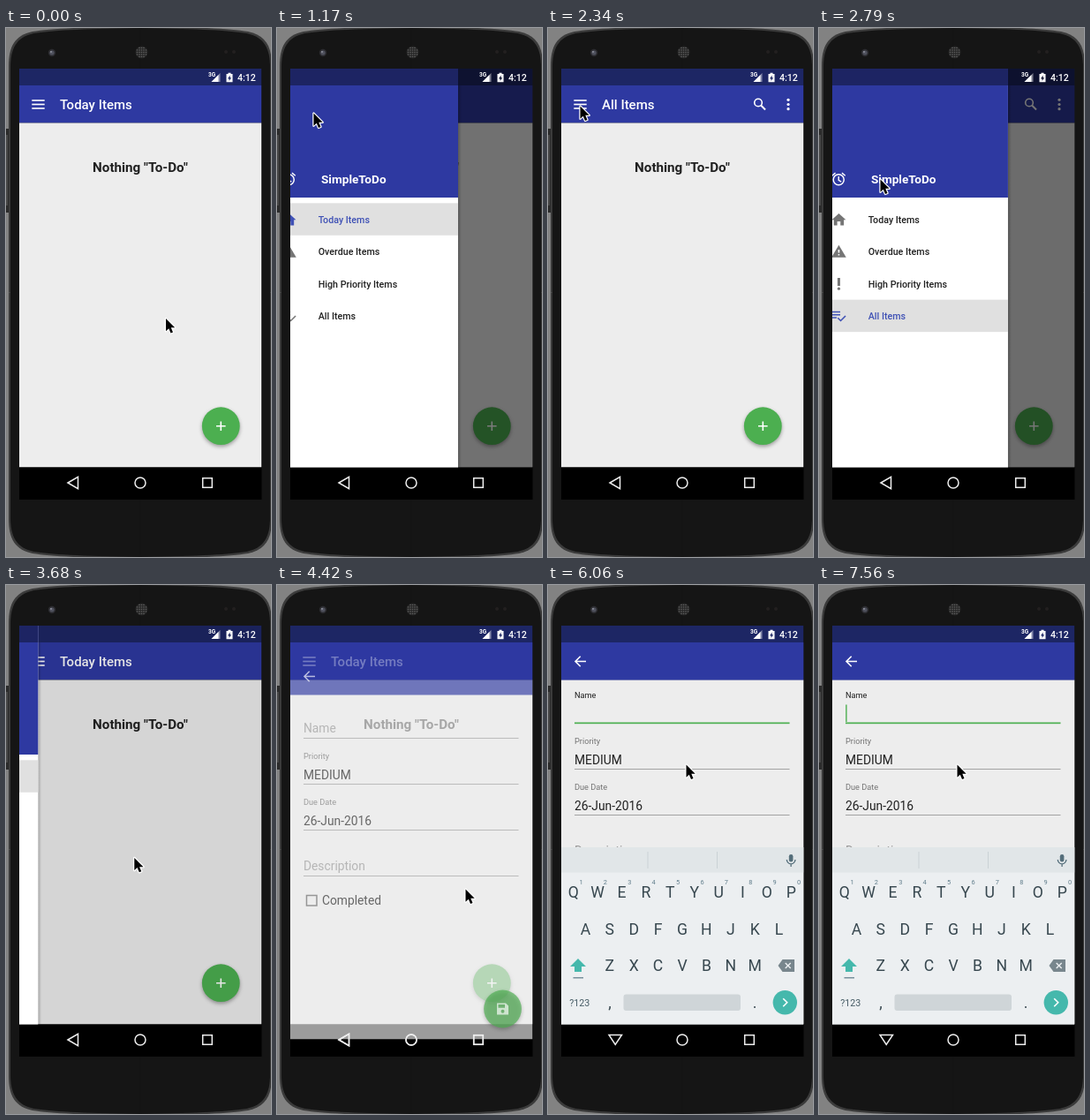
An HTML page with a canvas for the animation above (8 s loop, 300x599 px).

```html
<!DOCTYPE html>
<html lang="en">
<head>
<meta charset="utf-8">
<title>To-do app demo</title>
<style>
html, body { margin: 0; width: 100%; height: 100%; overflow: hidden; background: #808080; }
canvas { display: block; width: 300px; height: 599px; }
</style>
</head>
<body>
<canvas id="stage"></canvas>
<script>
const W = 300, H = 599, LOOP = 8000, STEP = 147.5;
const BLUE = '#2e39a1', GREEN = '#4caf50', TEAL = '#45b8ac', PAPER = '#ededed', INK = '#212121';
const LEFT = 15, WIDTH = 274.4, BOTTOM = 497.4;
const canvas = document.getElementById('stage');
const c = canvas.getContext('2d');
const dpr = window.devicePixelRatio || 1;
canvas.width = W * dpr;
canvas.height = H * dpr;

// Tracks: [step, value...] with linear motion between points
const POINTER = [
  [2, 180.5, 328.5], [5, 75, 135], [6, 38, 87], [7, 38, 88], [8, 41, 96], [9, 52, 165],
  [11, 70, 318], [13, 70, 313.5], [16, 36, 88], [17, 36, 88], [18, 42, 100],
  [19, 69, 171], [21, 78, 212], [23, 80, 216], [28, 242, 447], [29, 242, 447],
  [30, 213, 344], [33, 156, 160], [36, 152, 146], [38, 153, 160], [39, 156, 203]
];
const DRAWER = [
  [6, 0], [7, .45], [8, .892], [9, 1], [11, 1], [12, .8], [13, .333], [14, 0],
  [17, 0], [18, .5], [19, .934], [20, 1], [23, 1], [24, .65], [25, .1], [26, 0]
];
const FORM_Y = [[30, 17], [31, 4], [32, 0]];
const FORM_ALPHA = [[30, .66], [31, 1]];
const FOCUS = [[37, 0], [38, .6], [39, 1]];

function track(points, n) {
  let a = points[0];
  if (n <= a[0]) return a.slice(1);
  for (const b of points) {
    if (n <= b[0]) {
      const k = (n - a[0]) / (b[0] - a[0]);
      return a.slice(1).map((v, i) => v + (b[i + 1] - v) * k);
    }
    a = b;
  }
  return a.slice(1);
}

function rect(x, y, w, h, color) {
  c.fillStyle = color;
  c.fillRect(x, y, w, h);
}
function round(x, y, w, h, r, color) {
  c.fillStyle = color;
  c.beginPath();
  c.roundRect(x, y, w, h, r);
  c.fill();
}
function disc(x, y, r, color) {
  c.fillStyle = color;
  c.beginPath();
  c.arc(x, y, r, 0, 7);
  c.fill();
}
function ring(x, y, r, color, width) {
  c.strokeStyle = color;
  c.lineWidth = width;
  c.beginPath();
  c.arc(x, y, r, 0, 7);
  c.stroke();
}
function fill(d, color, x = 0, y = 0) {
  c.save();
  c.translate(x, y);
  c.fillStyle = color;
  c.fill(new Path2D(d), 'evenodd');
  c.restore();
}
function stroke(d, color, width, x = 0, y = 0) {
  c.save();
  c.translate(x, y);
  c.strokeStyle = color;
  c.lineWidth = width;
  c.stroke(new Path2D(d));
  c.restore();
}
// y is the middle of the capitals
function text(s, x, y, size, color, weight = 400, align = 'left') {
  c.font = `${weight} ${size}px Roboto, sans-serif`;
  c.textAlign = align;
  c.fillStyle = color;
  c.fillText(s, x, y + size * .356);
}
function clip(x, y, w, h, draw) {
  c.save();
  c.beginPath();
  c.rect(x, y, w, h);
  c.clip();
  draw();
  c.restore();
}

// Body with bowed top and bottom edges, symmetric about both axes
function shell(inset, color) {
  const quarter = new Path2D('M0 0H-149V-256C-149 -279 -142 -291 -122 -295.5C-102 -298.5 -72 -300.5 0 -301.5Z');
  c.fillStyle = color;
  for (const sx of [-1, 1]) {
    for (const sy of [-1, 1]) {
      c.save();
      c.translate(152, 299.5);
      c.scale(sx * (1 - inset / 149), sy * (1 - inset / 301));
      c.fill(quarter);
      c.restore();
    }
  }
  rect(5, 299, 294, 1, color);
  rect(151.5, 2, 1, 595, color);
}

function phone() {
  rect(0, 0, W, H, '#828282');
  round(-3, 114, 8, 95, 2, '#2b2b2b');
  rect(0, 121, 2, 80, '#4a4a4a');
  shell(0, '#3b3b3b');
  shell(2, '#151515');
  disc(52, 28, 4.2, '#2c2c30');
  disc(52, 28, 2.6, '#50525e');
  disc(51, 27, 1.1, '#8a8c98');
  disc(153.5, 27.5, 7, '#262626');
  for (let y = -5; y <= 5; y += 2.5)
    for (let x = -5; x <= 5; x += 2.5)
      if (Math.hypot(x, y) < 6.2) disc(153.5 + x, 27.5 + y, .8, '#626262');
  disc(249, 27, 2, '#232020');
  disc(258, 27, 2, '#232020');
}

function navBar(keyboard) {
  rect(LEFT, 497, WIDTH, 37, '#000');
  navIcons(keyboard);
}
function navIcons(keyboard) {
  stroke(keyboard ? 'M69 509.5H83.5L76.2 520.5Z' : 'M70 515L81.5 508.3V521.7Z', '#eee', 1.5);
  ring(152, 515, 6, '#eee', 1.5);
  c.strokeRect(222.7, 509.7, 10.6, 10.6);
}

function statusIcons() {
  text('3G', 229, 53, 6.5, '#fff', 700);
  fill('M242.5 51V61H232.5Z', 'rgba(255,255,255,.45)');
  fill('M240.5 53V61H232.5Z', '#fff');
  fill('M249.5 52H251.5V50.7H254.5V52H256.5V61.3H249.5ZM253.6 53.5L251 57.5H252.6V60L255.1 56.2H253.6Z', '#fff');
  text('4:12', 262, 56.3, 10.6, '#fff', 500);
}

function fab(x, y) {
  c.save();
  c.shadowColor = 'rgba(0,0,0,.35)';
  c.shadowBlur = 4 * dpr;
  c.shadowOffsetY = 2 * dpr;
  disc(x, y, 21.4, GREEN);
  c.restore();
}

function home(all) {
  rect(LEFT, 46, WIDTH, 19, '#1d2664');
  rect(LEFT, 65, WIDTH, 42.5, BLUE);
  rect(LEFT, 107.5, WIDTH, 390, PAPER);
  for (const y of [82, 86.5, 91]) rect(29.3, y - .8, 14.4, 1.6, '#fff');
  text(all ? 'All Items' : 'Today Items', 61, 87, 15, '#fff', 500);
  if (all) {
    ring(238, 84.5, 4.3, '#fff', 1.6);
    stroke('M241 87.5L246 92.5', '#fff', 2);
    for (const y of [81.3, 86.5, 91.7]) disc(272, y, 1.6, '#fff');
  }
  text('Nothing "To-Do"', 152, 158, 15.2, INK, 700, 'center');
  fab(243.3, 450.7);
  stroke('M-5.3 0H5.3M0 -5.3V5.3', '#fff', 1.6, 243.3, 450.7);
}

const ICONS = [
  col => fill('M-1.8 6.5V2H1.8V6.5H5.7V.3H8L0 -7L-8 .3H-5.7V6.5Z', col, 36.5, 217),
  col => fill('M-8.3 6.8H8.3L0 -7.2ZM-.8 2.9H.8V4.5H-.8ZM-.8 -2H.8V1.4H-.8Z', col, 36.5, 253),
  col => {
    rect(35, 283, 3, 9, col);
    disc(36.5, 295.2, 1.6, col);
  },
  col => {
    stroke('M-8 -4.5H2.5M-8 -1.3H2.5M-8 2H-1.5', col, 1.6, 35.6, 326);
    stroke('M-.3 2.3L3 5.5L8.5 0', col, 1.6, 35.6, 326);
  }
];
const ROWS = ['Today Items', 'Overdue Items', 'High Priority Items', 'All Items'];

function drawer(p, selected) {
  if (p <= 0) return;
  rect(LEFT, 46, WIDTH, 452, `rgba(0,0,0,${.57 * Math.pow(p, .75)})`);
  const edge = LEFT + 213 * p;
  const shade = c.createLinearGradient(edge, 0, edge + 4, 0);
  shade.addColorStop(0, 'rgba(0,0,0,.22)');
  shade.addColorStop(1, 'rgba(0,0,0,0)');
  rect(edge, 65, 4, 433, shade);
  c.translate(edge - 228, 0);
  rect(15, 46, 213, 452, '#fff');
  rect(15, 46, 213, 146, BLUE);
  rect(15, 46, 213, 19, '#1d2463');
  ring(36.3, 171.8, 6, '#fff', 1.5);
  stroke('M36.3 168V172.3L39.3 174.2M28.8 167.3L32.6 164.1M43.8 167.3L40 164.1', '#fff', 1.4);
  text('SimpleToDo', 73, 171.5, 13.6, '#fff', 700);
  ROWS.forEach((label, i) => {
    const y = 217 + 36.45 * i, on = i === selected;
    if (on) rect(15, y - 18.7, 213, 36.5, '#e0e0e0');
    ICONS[i](on ? '#3f51b5' : '#757575');
    text(label, 69.7, y, 10.7, on ? '#3f51b5' : INK, 500);
  });
}

function field(label, value, y) {
  text(label, 30, y - 21, 9.2, '#757575');
  text(value, 30, y, 13.8, INK);
  rect(30, y + 10, 243.5, 1, '#a2a2a2');
}

function form(focus, caret) {
  rect(LEFT, 107.5, WIDTH, 390, PAPER);
  rect(LEFT, 48, WIDTH, 59.5, BLUE);
  stroke('M43 86.5H31.5M36.7 80.8L31 86.5L36.7 92.2', '#fff', 1.6);
  const size = 13.8 - 4.6 * focus;
  text('Name', 30, 145 - 20 * focus, size, focus ? INK : '#9a9a9a');
  if (focus) rect(30, 155.5, 243.5, 1.7, GREEN);
  else rect(30, 156, 243.5, 1, '#a2a2a2');
  if (caret) rect(30.2, 135.5, 1.4, 19.5, GREEN);
  field('Priority', 'MEDIUM', 198);
  field('Due Date', '26-Jun-2016', 250);
  text('Description', 30, 301, 13.8, '#9a9a9a');
  rect(30, 312, 243.5, 1, '#a2a2a2');
  c.strokeStyle = '#6a6a6a';
  c.lineWidth = 1.5;
  c.strokeRect(33.5, 334.5, 11.5, 11.5);
  text('Completed', 51, 340.5, 13.8, INK);
  if (focus) return;
  fab(255.5, 463);
  fill('M-6.5 -6.5H3.5L6.5 -3.5V6.5H-6.5ZM-5 -5V-1.3H2.5V-5ZM-2 2.8a2 2 0 1 0 4 0a2 2 0 1 0 -4 0Z', '#fff', 255.5, 463);
}

function keyRow(keys, x, y) {
  [...keys].forEach((k, i) => text(k, x + 27.4 * i, y, 17.6, '#37474f', 400, 'center'));
}
function keyboard(offset) {
  c.translate(0, offset);
  rect(LEFT, 297, WIDTH, 201, '#eceff1');
  rect(LEFT, 297, WIDTH, 28.5, '#e1e6e8');
  rect(112.5, 302, 1, 19, '#cbd2d5');
  rect(191, 302, 1, 19, '#cbd2d5');
  round(272.8, 305, 4.6, 8.5, 2.3, '#546e7a');
  stroke('M270.3 311a4.8 4.8 0 0 0 9.6 0M275.1 316V319', '#546e7a', 1.3);
  keyRow('QWERTYUIOP', 28.7, 347.5);
  [...'1234567890'].forEach((k, i) => text(k, 37.5 + 27.4 * i, 336, 7.4, '#607d8b', 400, 'center'));
  keyRow('ASDFGHJKL', 42.4, 389.5);
  keyRow('ZXCVBNM', 69.8, 431);
  fill('M34 423L43 432H38V438H30V432H25Z', TEAL);
  rect(28.5, 444, 11.5, 1.5, '#78909c');
  fill('M260.5 431L265.5 424H279V438H265.5Z', '#78868d');
  stroke('M268.7 428L274.7 434M274.7 428L268.7 434', '#eceff1', 1.4);
  text('?123', 35.7, 473, 10.7, '#455a64', 400, 'center');
  text(',', 70, 473, 17.6, '#37474f', 400, 'center');
  round(85.5, 463.5, 132.5, 18.5, 3, '#cfd5d8');
  text('.', 234, 473, 17.6, '#37474f', 400, 'center');
  disc(268.3, 472.8, 13.7, TEAL);
  stroke('M266.2 468.3L270.7 472.8L266.2 477.3', '#fff', 1.6);
}

function pointer(x, y) {
  const d = 'M0 0V14.2L3.3 11.2L5.5 16.4L8 15.4L5.8 10.3H10.2Z';
  c.lineJoin = 'round';
  stroke(d, '#fff', 2.4, x + .5, y + .5);
  fill(d, '#000', x + .5, y + .5);
  c.lineJoin = 'miter';
}

function draw(t) {
  const n = Math.max(0, Math.floor((t + 20) / STEP));
  const [focus] = track(FOCUS, n);
  const all = n >= 12 && n < 23;
  const caret = focus === 1 && (t < 6060 || (t >= 6510 && t < 7110) || t >= 7560);

  c.setTransform(dpr, 0, 0, dpr, 0, 0);
  phone();
  navBar(focus > 0);
  clip(LEFT, 46, WIDTH, BOTTOM - 46, () => {
    home(all);
    drawer(track(DRAWER, n)[0], n >= 12 && n < 22 ? 3 : 0);
  });
  if (n >= 30) {
    const [y] = track(FORM_Y, n);
    clip(LEFT, 65, WIDTH, BOTTOM - 65 + y, () => {
      c.globalAlpha = track(FORM_ALPHA, n)[0];
      c.translate(0, y);
      form(focus, caret);
    });
    if (y) navIcons(false);
  }
  if (focus) clip(LEFT, 297, WIDTH, BOTTOM - 297, () => keyboard(200 * (1 - focus)));
  statusIcons();
  pointer(...track(POINTER, n));
}

const start = performance.now();
function tick() {
  draw((performance.now() - start) % LOOP);
  requestAnimationFrame(tick);
}
tick();
</script>
</body>
</html>
```
